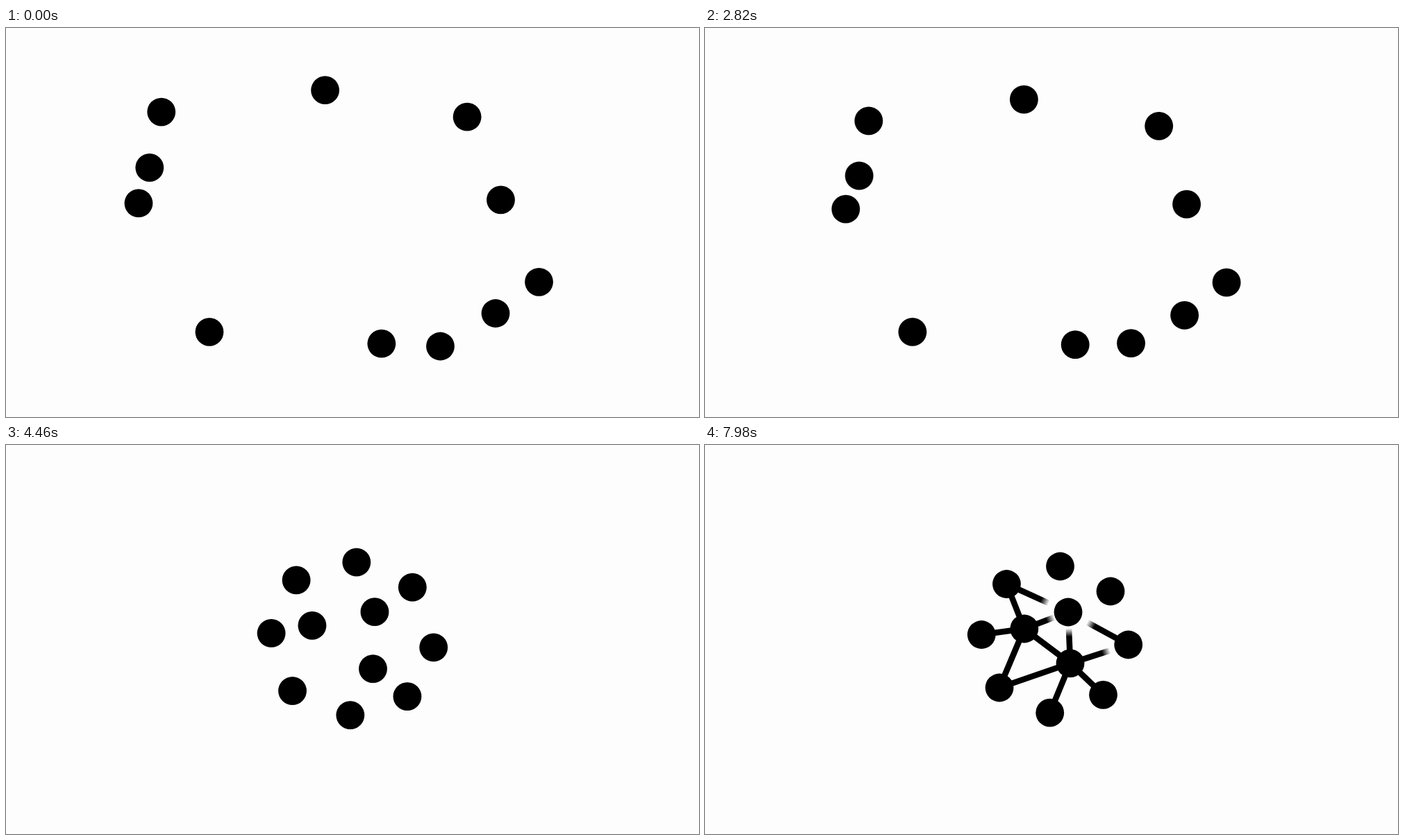
Animation, 998 px wide and 561 px high, one loop 8000 ms. Source, as an HTML page with a canvas:

```html
<!DOCTYPE html>
<html lang="en">
<head>
<meta charset="utf-8">
<title>Dots joining into a network</title>
<style>
  html, body { margin: 0; width: 100%; height: 100%; overflow: hidden; background: #fdfdfd; }
  canvas { display: block; }
</style>
</head>
<body>
<canvas id="stage" width="998" height="561"></canvas>
<script>
const ctx = document.getElementById('stage').getContext('2d');
const LOOP = 8000, RADIUS = 20.4, LINE = 8.6, SAMPLES = 15;

// Steps at which the phases of the movement begin.
const GATHER = 37, RUSH = 70, SETTLE = 83, REST = 150;

const dot = (x0, y0, x1, y1) => ({ x0, y0, x1, y1 });
const top_ = dot(459, 99, 511.5, 175);
const upRight = dot(662.5, 137.5, 584, 211);
const core = dot(710, 256.5, 523, 241);
const right = dot(765.3, 374.3, 609.7, 288);
const lowRight = dot(703, 419.7, 573.5, 360.3);
const hub = dot(623.7, 466.5, 526, 314.8);
const bottom = dot(539.5, 463.3, 496.7, 386.2);
const lowLeft = dot(293, 446.3, 424, 350);
const left = dot(191.6, 261.5, 398.2, 273.5);
const mid = dot(207.8, 210.5, 459.8, 265);
const upLeft = dot(224.4, 130.3, 434.4, 200.5);
const dots = [top_, upRight, core, right, lowRight, hub, bottom, lowLeft, left, mid, upLeft];

const waves = [
  { start: 107, links: [[lowLeft, mid], [lowLeft, hub]] },
  { start: 132, links: [[mid, upLeft], [mid, left], [mid, hub], [hub, bottom], [hub, lowRight]] },
  { start: 161, links: [[upLeft, core], [right, core], [mid, core], [hub, core], [hub, right]] }
];

const span = (n, from, to) => Math.min(1, Math.max(0, (n - from) / (to - from)));
const opening = n => (1 - span(n, 0, GATHER)) ** 2;

// Slow start, quick rush, long settling.
function progress(n) {
  if (n < GATHER) return -0.008 * opening(n);
  if (n < RUSH) return 0.15 * span(n, GATHER, RUSH) ** 2.4;
  if (n < SETTLE) {
    const s = span(n, RUSH, SETTLE);
    return 0.15 + 0.7 * (0.2 * s + 0.8 * s * s * (3 - 2 * s));
  }
  return 1 - 0.15 * (1 - span(n, SETTLE, REST)) ** 4.55;
}

// Shared movement of the view: it sinks at first, then sways.
function pan(n) {
  const sway = Math.sin(Math.PI * span(n, GATHER, 131) ** 0.85);
  return [opening(n) - 4 * sway, -8.7 * opening(n) - 1.5 * sway];
}

function place(d, n) {
  const p = progress(n), [dx, dy] = pan(n);
  return [d.x0 + p * (d.x1 - d.x0) + dx, d.y0 + p * (d.y1 - d.y0) + dy];
}

// Uneven step lengths: 20, 100 and 20 ms.
function stepAt(t) {
  const m = t % 140;
  return 3 * Math.floor(t / 140) + (m < 20 ? 0 : m < 120 ? 1 : 2);
}

// Averages positions within a step for motion blur.
function drawDots(n) {
  const samples = n > GATHER && n < REST ? SAMPLES : 1;
  ctx.globalCompositeOperation = 'lighter';
  ctx.globalAlpha = 1 / samples;
  ctx.fillStyle = '#000';
  for (let i = 0; i < samples; i++) {
    const moment = n + ((i + 0.5) / samples - 0.5) / 2;
    for (const d of dots) {
      ctx.beginPath();
      ctx.arc(...place(d, moment), RADIUS, 0, 2 * Math.PI);
      ctx.fill();
    }
  }
  ctx.globalCompositeOperation = 'source-over';
  ctx.globalAlpha = 1;
}

// A line grows from one dot to the other with a soft tip.
function drawLink([from, to], age, n) {
  const [x0, y0] = place(from, n), [x1, y1] = place(to, n);
  const grown = 0.19 + 0.65 * (1 - Math.exp(-age / 7)) + 0.15 * Math.max(0, age - 24);
  const tip = Math.hypot(x1 - x0, y1 - y0) * Math.min(1, grown);
  const fade = 12 * Math.min(1, (age + 2) / 8, 10 / Math.max(age, 1));
  ctx.save();
  ctx.translate(x0, y0);
  ctx.rotate(Math.atan2(y1 - y0, x1 - x0));
  const paint = ctx.createLinearGradient(tip - fade, 0, tip, 0);
  paint.addColorStop(0, 'rgba(0,0,0,1)');
  paint.addColorStop(1, 'rgba(0,0,0,0)');
  ctx.fillStyle = paint;
  ctx.fillRect(0, -LINE / 2, tip, LINE);
  ctx.restore();
}

function draw(t) {
  const n = stepAt(t);
  ctx.clearRect(0, 0, 998, 561);
  drawDots(n);
  for (const { start, links } of waves) {
    if (n >= start) links.forEach(link => drawLink(link, n - start, n));
  }
}

let begin;
function tick(now) {
  begin ??= now;
  draw(Math.max(0, now - begin) % LOOP);
  requestAnimationFrame(tick);
}
draw(0);
requestAnimationFrame(tick);
</script>
</body>
</html>
```
